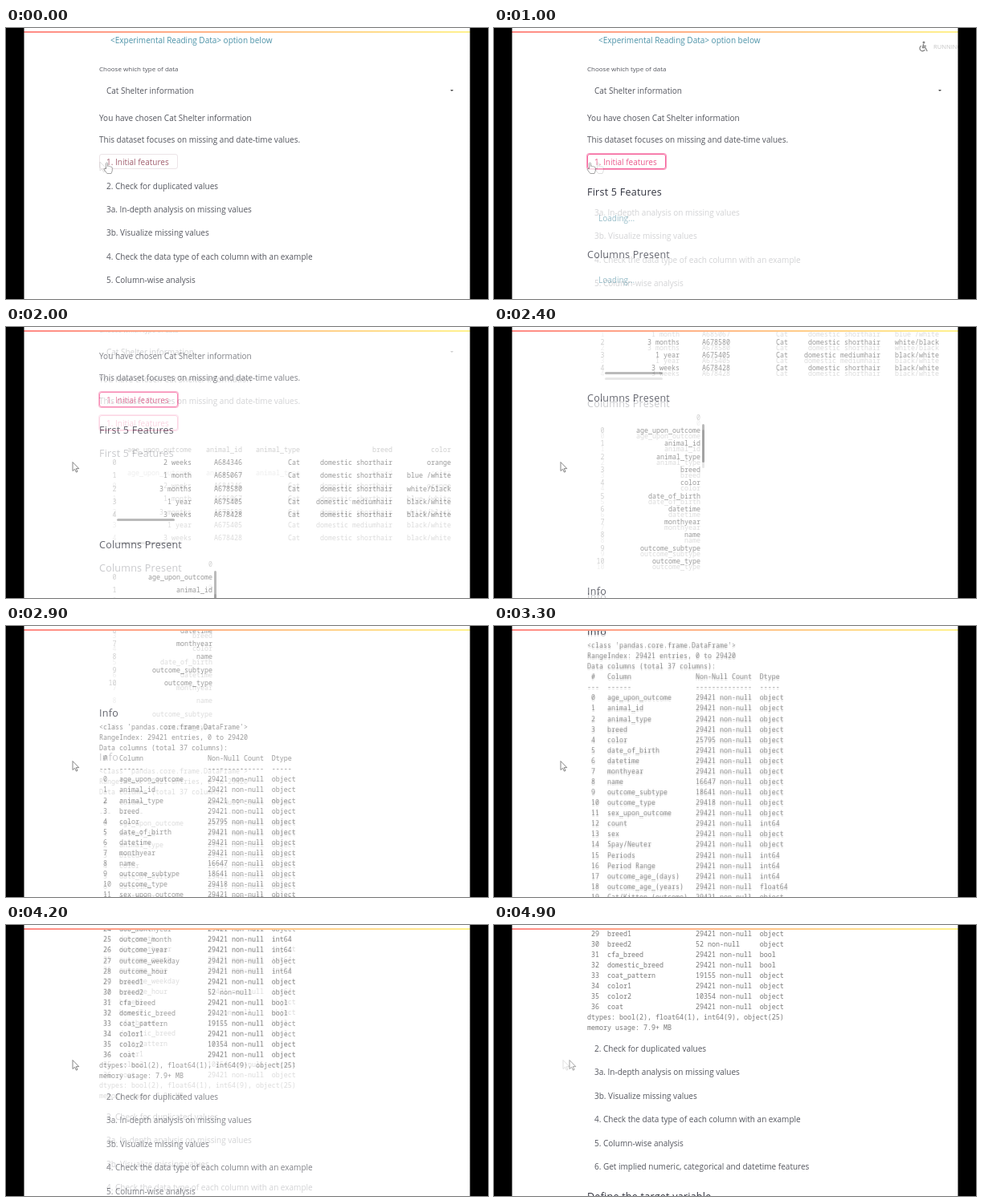
Animation, 600 px wide and 338 px high, one loop 5 s. Source, as an HTML page:

```html
<!DOCTYPE html>
<html lang="en">
<head>
<meta charset="utf-8">
<title>Cat Shelter information</title>
<style>
html, body { margin: 0; width: 100%; height: 100%; overflow: hidden; background: #000; }
#stage { position: relative; width: 600px; height: 338px; overflow: hidden; background: #fff; }
.layer { position: absolute; inset: 0; overflow: hidden; background: #fff; }
.layer + .layer { opacity: .74; }
.page { position: absolute; left: 0; top: 0; width: 600px; }
.page span, .page pre, .page i { position: absolute; margin: 0; white-space: pre; }
span { font: 10px/14px "Open Sans", sans-serif; color: #55575f; }
span.label { font-size: 8px; }
span.link { color: #4d93a8; }
span.load { color: #77a9b8; }
span.head { font-size: 12.5px; font-weight: 500; letter-spacing: .25px; color: #31333f; }
span.mono, pre { font: 300 8.33px/13.08px "Noto Sans Mono", monospace; color: #787878; }
span.mono { line-height: 14px; }
span.dim { color: #c0c0c0; }
.page span.button { left: 116px; top: 157px; width: 98px; height: 19px; box-sizing: border-box; padding-left: 8px;
  line-height: 18px; border: 1px solid #ece4e7; border-radius: 3px; color: #a2606f; }
.page span.button.focus { border-color: #f5639a; box-shadow: 0 0 0 1px #f99bc0; color: #ea5a8c; }
i.bar { background: #a3a3a3; border-radius: 2px; }
i.caret { left: 553px; top: 76.5px; border: solid transparent; border-width: 2.5px 2.5px 0; border-top-color: #444; }
svg { position: absolute; left: 0; top: 0; width: 600px; height: 338px; }
.pointer path { fill: #fff; stroke: #777; stroke-width: .9; stroke-linejoin: round; }
.running text { font: 7.6px "Open Sans", sans-serif; fill: #c4c4c4; }
.running path { fill: none; stroke: #888; stroke-width: 1.3; stroke-linecap: round; stroke-linejoin: round; }
#chrome { position: absolute; inset: 0;
  background: linear-gradient(90deg, #000 22px, transparent 23px 577px, #000 578px),
    linear-gradient(#fff, #fff) 0 0 / 100% 4px no-repeat,
    linear-gradient(90deg, #ff8585, #ffbd88 50%, #fff68e) 0 4px / 100% 2px no-repeat; }
</style>
</head>
<body>
<div id="stage"></div>
<script>
const STEP = 100, LOOP = 5000;
const esc = s => s.replace(/</g, '&lt;');
const text = (s, x, y, cls = '') => `<span class="${cls}" style="left:${x}px;top:${y - 7}px">${esc(s)}</span>`;
const cell = (s, right, y, cls = '') =>
  `<span class="mono ${cls}" style="right:${600 - right}px;top:${y - 7}px">${s}</span>`;
const bar = (x, y, w, h) => `<i class="bar" style="left:${x}px;top:${y}px;width:${w}px;height:${h}px"></i>`;
const group = (stages, html) => `<div data-stages="${stages}">${html}</div>`;

const options = ['2. Check for duplicated values', '3a. In-depth analysis on missing values',
  '3b. Visualize missing values', '4. Check the data type of each column with an example',
  '5. Column-wise analysis', '6. Get implied numeric, categorical and datetime features'];
const menu = (y, from = 0) => options.slice(from).map((s, k) => text(s, 125, y + 29.4 * k)).join('');

// name, dtype (default object), non-null count (default 29421)
const columns = `age_upon_outcome|animal_id|animal_type|breed|color,,25795|date_of_birth|datetime|monthyear|name,,16647
|outcome_subtype,,18641|outcome_type,,29418|sex_upon_outcome|count,int64|sex|Spay/Neuter|Periods,int64|Period Range,int64
|outcome_age_(days),int64|outcome_age_(years),float64|Cat/Kitten (outcome)|sex_age_outcome|age_group|dob_year,int64
|dob_month,int64|dob_monthyear|outcome_month,int64|outcome_year,int64|outcome_weekday|outcome_hour,int64|breed1
|breed2,,52|cfa_breed,bool|domestic_breed,bool|coat_pattern,,19155|color1|color2,,10354|coat`
  .replace(/\n/g, '').split('|').map(c => c.split(','));

function featureTable() {
  const edges = [231, 294, 366, 481, 554];
  const rows = ['2 weeks,A684346,shorthair,orange', '1 month,A685067,shorthair,blue /white',
    '3 months,A678580,shorthair,white/black', '1 year,A675405,mediumhair,black/white',
    '3 weeks,A678428,shorthair,black/white'];
  const header = columns.slice(0, 5).map(([name], k) => cell(name, edges[k], 229, 'dim')).join('');
  return header + rows.map((row, r) => {
    const [age, id, hair, color] = row.split(','), y = 245 + 16.25 * r;
    return cell(r, 137.5, y, 'dim') +
      [age, id, 'Cat', 'domestic ' + hair, color].map((s, k) => cell(s, edges[k], y)).join('');
  }).join('') + bar(138, 314.5, 72, 3);
}

function columnTable() {
  return cell('0', 257, 372, 'dim') + columns.slice(0, 11).map(([name], k) =>
    cell(k, 137.5, 388 + 16.3 * k, 'dim') + cell(name, 257, 388 + 16.3 * k)).join('') + bar(258.5, 380, 3.5, 48);
}

function info() {
  const line = (n, name, count, type) => ` ${n}`.padEnd(5) + name.padEnd(22) + count.padEnd(16) + type;
  const lines = ["<class 'pandas.core.frame.DataFrame'>", 'RangeIndex: 29421 entries, 0 to 29420',
    'Data columns (total 37 columns):', line('#', 'Column', 'Non-Null Count', 'Dtype'),
    '---  ' + '------'.padEnd(22) + '--------------  -----',
    ...columns.map(([name, type, count], n) => line(n, name, `${count || 29421} non-null`, type || 'object')),
    'dtypes: bool(2), float64(1), int64(9), object(25)', 'memory usage: 7.9+ MB'];
  return `<pre style="left:116px;top:599px">${esc(lines.join('\n'))}</pre>`;
}

const page =
  text('<Experimental Reading Data> option below', 130, 15, 'link') +
  text('Choose which type of data', 116, 50.5, 'label') +
  text('Cat Shelter information', 125, 77.5) + '<i class="caret"></i>' +
  text('You have chosen Cat Shelter information', 116, 112) +
  text('This dataset focuses on missing and date-time values.', 116, 139) +
  '<span class="button">1. Initial features</span>' +
  group('0', menu(196.5)) +
  group('1', menu(230, 1)) +
  group('123', text('First 5 Features', 116, 205, 'head')) +
  group('2', text('Loading...', 130, 237, 'load') + text('Columns Present', 116, 283, 'head') +
    text('Loading...', 130, 314, 'load')) +
  group('3', featureTable() + text('Columns Present', 116, 348, 'head') + columnTable() +
    text('Info', 116, 589, 'head') + info() + menu(1194) + text('Define the target variable', 116, 1379, 'head'));

const overlay = `<svg>
  <g class="running"><circle cx="535" cy="18" r="1.5" fill="#888"/>
    <path d="M534.5 20.5L533.5 24.5H537L539 28.5M534 22.5H537.5M531.5 22.5A3.4 3.4 0 1 0 536 27.5"/>
    <text x="547" y="26">RUNNING...</text></g>
  <g class="pointer"><path class="arrow" d="M0 0V11L2.6 8.7L4.4 12.6L6 11.9L4.3 8.1H7.8Z"/>
    <path class="hand" d="M2.5 8V1.2Q3.5 -.5 4.5 1.2V5Q5.8 4 6.6 5.3Q7.8 4.5 8.5 5.8Q10 5.2 10.3 6.8V10.5L9 14H3.8L.2 9.2Q.3 7 2.5 8Z"/></g>
</svg>`;

const layerHtml = `<div class="layer"><div class="page">${page}</div>${overlay}</div>`;
stage.innerHTML = layerHtml + layerHtml + '<div id="chrome"></div>';
const layers = [...document.querySelectorAll('.layer')];

// [step, value] points joined by straight lines
const scrollPath = [[17, 0], [18, 18], [19, 47], [20, 76], [21, 135], [22, 205], [23, 252], [24, 259], [25, 262],
  [29, 480], [31, 565], [32, 580.5], [33, 582], [34, 586], [37, 683], [38, 728.5], [41, 955], [43, 1006], [46, 1012], [48, 1040]];
const pointerPath = [[-1, 117], [0, 122], [2, 125], [9, 126], [10, 116], [11, 100], [12, 87], [14, 83], [47, 83], [48, 86], [49, 94]];

function along(path, s) {
  const k = path.findIndex(p => p[0] >= s);
  if (k < 0) return path[path.length - 1][1];
  if (k === 0) return path[0][1];
  const [[s0, a], [s1, b]] = [path[k - 1], path[k]];
  return a + (b - a) * (s - s0) / (s1 - s0);
}

function show(layer, s) {
  const find = q => layer.querySelector(q);
  const state = s < 9 ? 0 : Math.min(s - 8, 3);
  const hand = s >= 0 && s <= 10;
  const toggle = (q, on) => { find(q).style.display = on ? '' : 'none'; };
  layer.querySelectorAll('[data-stages]').forEach(g => { g.hidden = !g.dataset.stages.includes(state); });
  find('.page').style.transform = `translateY(${-along(scrollPath, s)}px)`;
  find('.button').classList.toggle('focus', s >= 6);
  find('.pointer').setAttribute('transform', `translate(${along(pointerPath, s)} ${hand ? 167.5 : s < 0 ? 167 : 168.5})`);
  toggle('.arrow', !hand);
  toggle('.hand', hand);
  toggle('.running', s >= 9 && s < 13);
}

// Each step blends over the one before it.
let last = -1;
function tick() {
  const s = Math.floor(performance.now() % LOOP / STEP);
  if (s !== last) layers.forEach((layer, k) => show(layer, s - 1 + k));
  last = s;
  requestAnimationFrame(tick);
}
tick();
</script>
</body>
</html>
```
